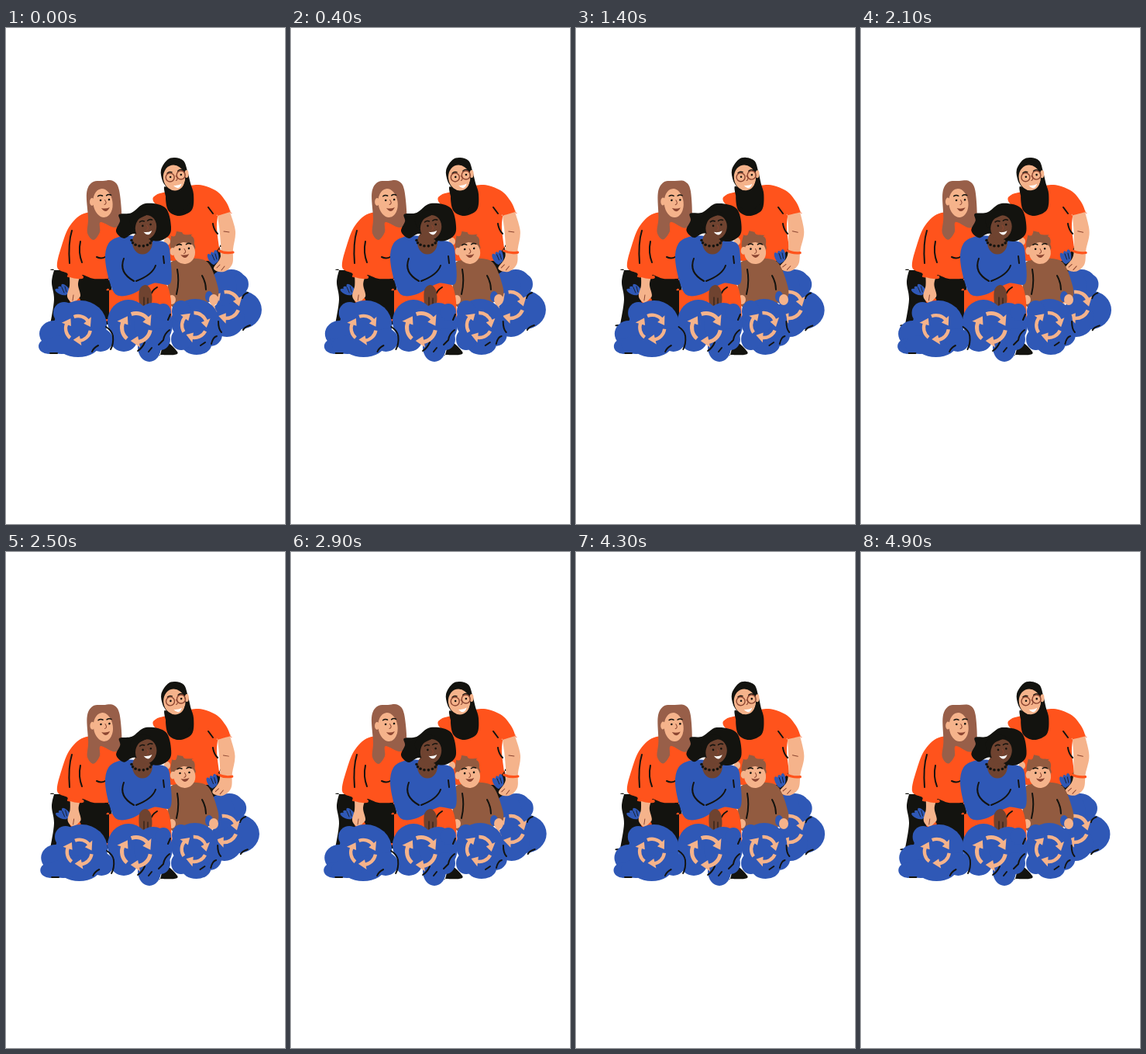
An HTML page for the animation above (5 s loop, 360 px wide and 639 px high).

```html
<!DOCTYPE html>
<html lang="en">
<head>
<meta charset="utf-8">
<style>
html, body { margin: 0; width: 100%; height: 100%; overflow: hidden; background: #fff; }
svg { display: block; width: 100%; height: 100%; }
</style>
</head>
<body>
<svg id="stage" viewBox="0 0 360 639"></svg>
<script>
const INK = '#13130f', ORANGE = '#ff531c', BLUE = '#2f58b6', SKIN = '#f5b38b',
      HAIR = '#985f49', DARK = '#6f4330', SWEATER = '#925b40', MOUTH = '#8c4632';
const movers = [];
let layer = document.getElementById('stage');

function add(tag, attrs) {
  const el = document.createElementNS('http://www.w3.org/2000/svg', tag);
  for (const k in attrs) el.setAttribute(k, attrs[k]);
  layer.appendChild(el);
  return el;
}

// Draws into a group; move(s) gives its transform for sway s from 0 to 1.
function group(draw, move) {
  const parent = layer, g = layer = add('g', {});
  draw();
  layer = parent;
  if (move) movers.push(s => g.setAttribute('transform', move(s)));
  return g;
}

// Smooth closed outline through "x,y" points; a star marks a corner.
function shape(color, text) {
  const p = text.split(' ').flatMap(w => {
    const q = w.replace('*', '').split(',').map(Number);
    return w.endsWith('*') ? [q, q] : [q];
  });
  const at = i => p[(i + p.length) % p.length];
  const d = p.map((b, i) => {
    const a = at(i - 1), c = at(i + 1), e = at(i + 2);
    return `C${b.map((v, j) => v + (c[j] - a[j]) / 6)} ${c.map((v, j) => v - (e[j] - b[j]) / 6)} ${c}`;
  });
  return add('path', { d: 'M' + p[0] + d.join('') + 'Z', fill: color });
}
const oval = (color, cx, cy, rx, ry = rx, turn = 0) =>
  add('ellipse', { cx, cy, rx, ry, fill: color, transform: `rotate(${turn} ${cx} ${cy})` });
const stroke = (d, width = 2, color = INK) =>
  add('path', { d, fill: 'none', stroke: color, 'stroke-width': width, 'stroke-linecap': 'round' });

// Three arrows chasing each other around a ring.
function recycle(x, y, r, turn = 0) {
  const pt = (a, q) => [x + q * Math.cos(a), y + q * Math.sin(a)];
  for (let k = 0; k < 3; k++) {
    const a = (turn - 110 + k * 120) * Math.PI / 180, b = a + 1.3, h = r * .4;
    add('path', { d: `M${pt(a, r)}A${r} ${r} 0 0 1 ${pt(b, r)}`, fill: 'none', stroke: SKIN, 'stroke-width': r * .27 });
    add('path', { d: `M${pt(b - .1, r - h)}L${pt(b - .1, r + h)}L${pt(b + .5, r)}Z`, fill: SKIN });
  }
}

// Eyes, brows, nose and smile around the point between the eyes.
function face(x, y, w, turn, drop, smile) {
  group(() => {
    for (const k of [-w, w]) {
      oval(INK, k, 0, 1.3);
      stroke(`M${k - 3} -5.5q3 -2 6 0`, 1.5);
    }
    stroke('M0 0q3 5 -1 6', 1, MOUTH);
    add('path', { d: `M-5.5 ${drop}q5.5 2 11 0q-5.5 9 -11 0`, fill: smile });
  }).setAttribute('transform', `translate(${x} ${y}) rotate(${turn})`);
}

// Tied top of a bag: three loose folds.
function knot(x, y, turn) {
  for (const k of [-1, 0, 1]) oval(BLUE, x + k * 3.2, y - 2 * k, 3.2, 8, turn + k * 12);
  stroke(`M${x - 2} ${y - 4}l3 7m1 -8l2 7`, .8);
}
const bag = lobes => lobes.forEach(l => oval(BLUE, ...l));
const squeeze = (x, k) => `translate(${x * k} 0) scale(${1 - k} 1)`;

// Man
shape(INK, '245,280* 276,282* 279,318* 245,318*');
group(() => {
  bag([[291, 328, 19, 17], [302, 330, 11, 13], [302, 363, 28, 25], [285, 375, 23, 23], [280, 335, 18, 23]]);
  stroke('M312 341q-6 2 -7 7M315 383q-7 2 -9 6');
  recycle(284, 357, 17, 12);
}, s => `translate(${-9.5 * s} 0) rotate(${s} 285 355)`);
shape(ORANGE, '190,223 194,215 207,211 245,202 270,209 284,224 290,238* 273,243* 272,258 275,283* 262,300* 203,300* 205,245');
stroke('M261 231l6 8M267 252q1 8 6 13');
oval(SKIN, 208, 275, 4, 5);
group(() => {
  knot(268, 296, -20);
  shape(SKIN, '273,242* 289,237* 296,262 293,285 292,304 281,314 268,310 277,294 276,265');
  stroke('M275 287q8 4 18 2', 3.2, ORANGE);
  stroke('M281 262l7 1M272 309l4 -4M278 312l4 -5', 1, MOUTH);
}, s => `rotate(${4.6 * s} 283 240)`);
group(() => {
  shape(INK, '202,197 200,183 208,170 218,167 229,171 234,184 238,200 242,214 240,234 224,242 210,236 206,220 208,208');
  oval(SKIN, 217, 193, 14, 16.5, -12);
  oval(SKIN, 233, 188, 2.5, 5);
  shape(INK, '204,205 216,210 227,207 232,196 238,206 240,222 224,236 211,229');
  face(219, 190.5, 7, -12, 11.5, '#fff');
  for (const k of [-1, 1])
    add('circle', { cx: 218.7 + 7 * k, cy: 191 - 1.5 * k, r: 5.5, fill: 'none', stroke: MOUTH, 'stroke-width': 1.4 });
}, s => `rotate(${1.5 * s} 222 228)`);

// Woman on the left
shape(INK, '62,312* 132,312* 145,382* 57,382* 62,350 59,328');
shape(ORANGE, '66,308 72,280 83,254 104,238 140,244 150,262 134,295 132,323* 113,323 99,318 98,322 80,321 79,316');
stroke('M85 261q-5 16 -3 42M96 275q-3 14 2 27M117 295q6 3 11 0');
group(() => {
  knot(74, 338, -55);
  oval(ORANGE, 89, 351, 7, 5);
  shape(SKIN, '82,320* 95,321* 93,331 96,344 93,349 86,354 79,346 82,332');
  stroke('M87 344l-1 7', 1, MOUTH);
  stroke('M82 319q8 3 16 2', 4, ORANGE);
}, s => `translate(${2 * s} 0)`);
group(() => {
  shape(HAIR, '104,213 111,199 125,197 138,197 146,209 149,248 140,257 122,250 121,263 113,273 105,264 106,245');
  oval(SKIN, 125, 225.5, 12.5, 18.5, -8);
  oval(SKIN, 111, 224, 3, 5);
  face(127.5, 221.5, 5.5, -5, 10, MOUTH);
}, s => `rotate(${2.5 * s} 124 255)`);

// Boy
shape(SWEATER, '211,308 220,299 246,297 262,304 273,332 273,347 262,353 240,365 211,355');
stroke('M221 311q3 16 -1 32M253 319q5 9 5 18');
oval(BLUE, 262, 346, 5, 7);
oval(SKIN, 214, 350, 5, 6);
oval(SKIN, 268, 350, 6, 7);
group(() => {
  shape(SWEATER, '213,285 213,268* 218,268 220,262* 227,263* 230,266 240,266* 239,270 244,284 230,290');
  oval(SKIN, 230, 289, 14, 15, -10);
  oval(SKIN, 215, 288, 3.5, 5);
  shape(SWEATER, '214,283 214,274 239,268 242,279 229,276 219,281');
  face(230, 284.5, 6, -6, 7, MOUTH);
}, s => `rotate(${5 * s} 231 302)`);

// Woman in the middle
shape(ORANGE, '133,338* 180,325* 204,328 212,345 214,375* 133,375*');
stroke('M186 346q2 -8 9 -12');
shape(INK, '199,421* 206,404 221,417 217,421');
shape(BLUE, '128,298 132,278 146,269 166,268 192,273 208,278 212,295 212,329 190,329 162,343 143,344 134,328');
stroke('M152 297q-7 18 13 29M193 306q-4 12 -25 20M203 294l1 9');
oval(DARK, 176, 276, 13, 15.5);
shape(DARK, '172,338 180,331 187,338 188,354 181,361 173,359');
stroke('M178 347v10M183 348v9', .9);
group(() => {
  shape(INK, '142,262 147,249 146,240 162,238 180,226 206,232 213,260 204,272 190,274 166,265 152,271');
  oval(DARK, 180.5, 257, 13.5, 16, 14);
  shape(INK, '164,258 170,247 186,238 172,236 160,246');
  face(181.5, 254, 5.2, -10, 8, '#fff');
}, s => `rotate(${2 * s} 178 275)`);
for (let i = 0; i < 8; i++) {
  const a = Math.PI * (.98 - i * .135);
  oval(INK, 175 + 13 * Math.cos(a), 273 + 8 * Math.sin(a), 1.8);
}

// Front bags
group(() => {
  bag([[244, 378, 31, 29], [226, 365, 12, 14], [264, 395, 15, 15], [246, 408, 19, 13], [226, 401, 13, 14]]);
  stroke('M274 378q0 10 4 14M251 409l6 -4M265 407q2 -9 7 -10');
}, s => squeeze(214, .045 * s));
group(() => recycle(243, 383, 16, 18), s => `translate(${-s} 0) rotate(${-4 * s} 243 383)`);

bag([[158, 378, 27, 28], [190, 382, 25, 28], [152, 402, 17, 15], [185, 411, 15, 19], [199, 401, 13, 14], [203, 366, 10, 11]]);
stroke('M211 389q-7 5 -8 13l-6 6M170 416q6 -4 9 -11M184 417l4 -5M209 376l3 -7');
recycle(168, 386, 18.5);

group(() => {
  bag([[96, 383, 34, 32], [75, 367, 14, 14], [62, 394, 19, 17], [55, 410, 13, 10], [93, 407, 28, 17], [122, 402, 16, 15], [72, 408, 20, 12]]);
  stroke('M129 385q8 5 9 12q1 10 -3 17M111 417q2 -5 8 -8M57 419h9');
}, s => `translate(${3.2 * s} 0) ${squeeze(139, .04 * s)}`);
group(() => recycle(93, 387, 16), s => `translate(${5.5 * s} ${-1.3 * s}) rotate(${-3 * s} 93 387)`);

function frame() {
  const t = Math.floor(performance.now() % 5000 / 100) * 100;
  const sway = (1 - Math.cos((t - 70) / 3000 * 2 * Math.PI)) / 2;
  movers.forEach(move => move(sway));
  requestAnimationFrame(frame);
}
frame();
</script>
</body>
</html>
```
